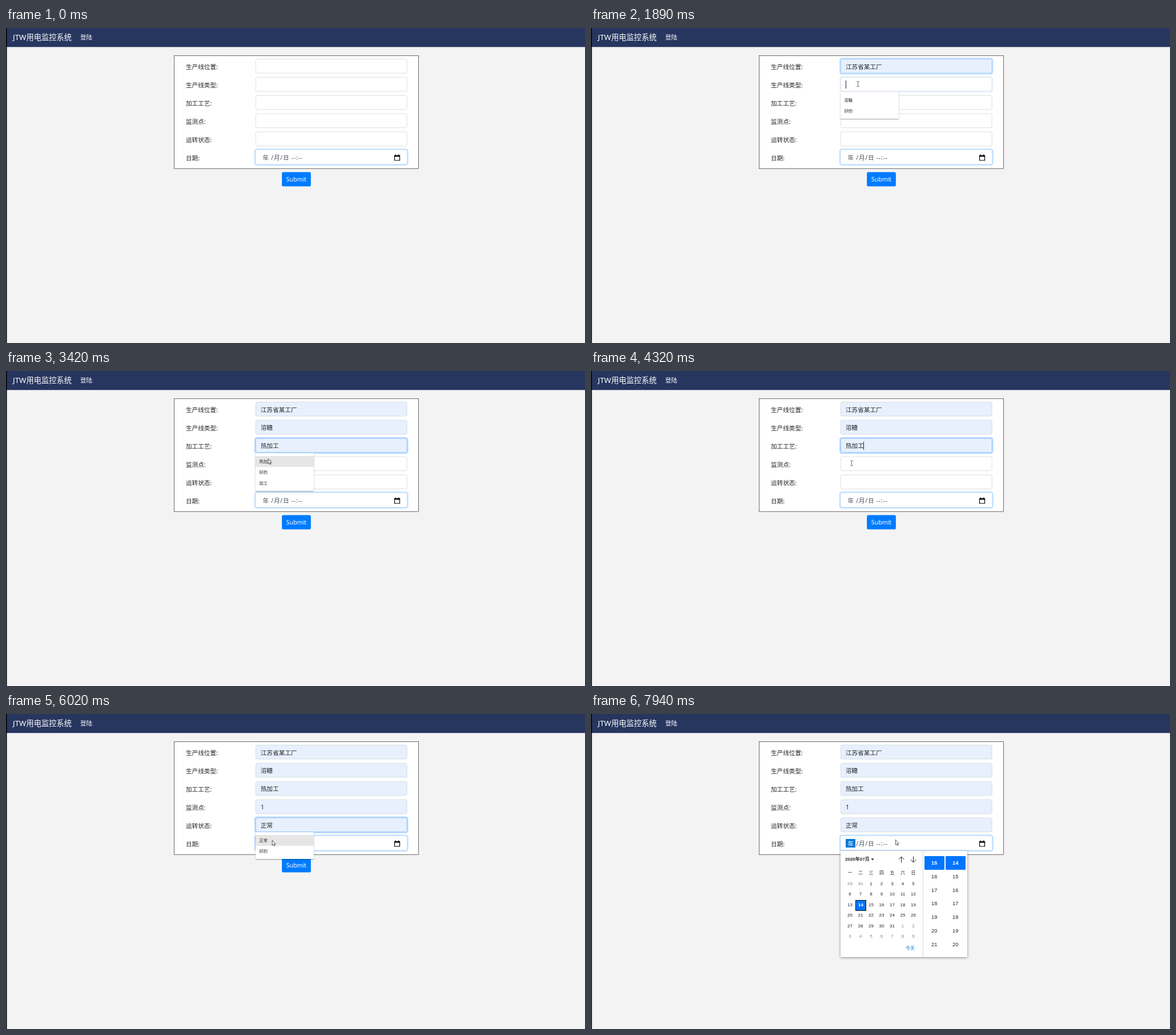
These frames come from a looping animation (1014 by 552 pixels, 8 s). An HTML page:

```html
<!DOCTYPE html>
<html lang="zh-CN">
<head>
<meta charset="utf-8">
<style>
  html, body { margin: 0; width: 100%; height: 100%; overflow: hidden; background: #f3f3f3; }
  body { position: relative; color: #212529; font: 10.63px "Noto Sans", "Noto Sans CJK SC", "Noto Sans CJK", sans-serif; }
  div { position: absolute; box-sizing: border-box; white-space: pre; }
  svg { position: absolute; left: 0; top: 0; overflow: visible; }
  .light { color: #fff; }
  .brand { font-size: 13.3px; }
  .center { text-align: center; }
  .caret { background: #222; }
  .date { color: #495057; letter-spacing: .7px; }
  .mark { background: #0078d7; }
  .menu { background: #fff; border-radius: 1px; box-shadow: 0 1px 2px rgba(0,0,0,.38); font-size: 7.3px; }
  .item { padding-left: 6.5px; }
  .picker { background: #fff; box-shadow: 0 1px 4px rgba(0,0,0,.45); font: 8px "Liberation Sans", "Noto Sans CJK SC", "Noto Sans CJK", sans-serif; }
  .title { font-weight: bold; }
  .cell, .hour { text-align: center; color: #222; }
  .hour { font-size: 9.33px; }
  .dim { color: #858585; }
  .today { color: #0078d7; }
  .rule { background: #d5d5d5; }
  .on { background: #0075ff; color: #fff; font-weight: bold; border-radius: 1px; }
  .cell.on { border: 1.5px solid #101010; border-radius: 0; }
</style>
</head>
<body>
<script>
const LOOP = 8000, LEFT = 437, WIDTH = 265.5, HEIGHT = 25.3, PITCH = 31.88, ROW = 19;
const fieldTop = k => 54.1 + PITCH * k;

function add(parent, cls, x, y, w, h, text = '') {
  const el = document.createElement('div');
  el.className = cls;
  el.style.cssText = `left:${x}px;top:${y}px;width:${w}px;height:${h}px;line-height:${h}px`;
  el.textContent = text;
  parent.append(el);
  return el;
}
function draw(parent, markup) {
  const svg = document.createElementNS('http://www.w3.org/2000/svg', 'svg');
  svg.setAttribute('width', 1);
  svg.setAttribute('height', 1);
  svg.innerHTML = markup;
  parent.append(svg);
  return svg;
}
// Rectangle by its outer edge; grow widens it on all sides
const rect = (x, y, w, h, grow, attrs) =>
  `<rect x="${x - grow}" y="${y - grow}" width="${w + 2 * grow}" height="${h + 2 * grow}" ${attrs}/>`;
const show = (el, on) => { el.style.visibility = on ? 'visible' : 'hidden'; };

// Static page
const page = document.body;
const LINE = .66;
draw(page,
  rect(0, 0, 1014, 33.3, 0, 'fill="#27365f"') +
  rect(0, 0, 1.5, 552, 0, 'fill="#000"') +
  rect(294, 48, 429, 198.6, -LINE / 2, `fill="#fff" stroke="#222" stroke-width="${LINE}"`) +
  rect(483.2, 252.4, 50.7, 25.2, 0, 'rx="2.7" fill="#007bff"'));
add(page, 'light brand', 12, 6, 110, 20, 'JTW用电监控系统');
add(page, 'light', 130, 6, 40, 20, '登陆');
add(page, 'light center', 483, 255, 51, 20, 'Submit');
['生产线位置', '生产线类型', '加工工艺', '监测点', '运转状态', '日期'].forEach((name, k) =>
  add(page, '', 315, 58.3 + PITCH * k, 100, 20, name + ':'));

// Form: focus time, time of choosing, where the pointer chooses, suggestions
const fields = [
  [880, 1570, [467.5, 98], ['江苏省某工厂']],
  [1850, 2630, [467, 123.5], ['溶糖', '好的']],
  [2940, 4320, [456.5, 161.5], ['热加工', '好的', '加工']],
  [4540, 5400, [464.5, 193], ['1', '2', '好的']],
  [5470, 6500, [466, 222], ['正常', '好的']],
  [7330, Infinity, null, []]
].map(([open, done, pick, items], k) => {
  const top = fieldTop(k);
  const svg = draw(page,
    rect(LEFT, top, WIDTH, HEIGHT, 2.1, 'rx="4.5" fill="#bfdeff"') +
    rect(LEFT, top, WIDTH, HEIGHT, -LINE / 2, `rx="2.5" stroke-width="${LINE}"`));
  const [ring, box] = svg.children;
  return { open, done, pick, items, top, ring, box };
});
fields.forEach((f, k) => { f.blur = k < 5 ? fields[k + 1].open : Infinity; });
const inputs = fields.slice(0, 5);

const measure = document.createElement('canvas').getContext('2d');
measure.font = getComputedStyle(page).font;
for (const f of inputs) {
  f.value = add(page, '', 446, f.top + 3.5, 200, 20);
  f.caret = add(page, 'caret', 446, f.top + 6, 1, 14);
}

const mark = add(page, 'mark', 446, 219, 17, 15);
const date = add(page, 'date', 449.5, 217, 100, 20);
date.innerHTML = '<span>年</span> /月/日 --:--';
const year = date.firstChild;
draw(page, `<path d="M680.5 223.5h9v8.500h-9z" fill="none" stroke="#000" stroke-width="1.2"/>
  <path d="M680 223h10v2.500h-10zM681.500 221.500h1.400v2h-1.400zM687 221.500h1.400v2h-1.400z"/>`);

for (const f of inputs) {
  f.menuTop = Math.round(f.top + HEIGHT + .5);
  f.menuHeight = 9 + ROW * f.items.length;
  f.menu = add(page, 'menu', LEFT, f.menuTop, 102, f.menuHeight);
  f.rows = f.items.map((s, i) => add(f.menu, 'item', 0, 4.5 + ROW * i, 102, ROW, s));
}

// Date picker, in its own coordinates
const picker = add(page, 'picker', LEFT, 240, 222, 186);
add(picker, 'title', 8, 5, 60, 20, '2020年07月');
draw(picker, `<path d="M53.5 13.5h5l-2.500 2.800z"/>
  <path d="M106.500 20.500V10M102 14.800l4.500-4.800 4.500 4.800M127.500 9.500V20M123 15.200l4.500 4.800 4.500-4.800" fill="none" stroke="#222"/>`);
const cell = (col, row, s, cls = '') =>
  add(picker, 'cell ' + cls, 7.3 + 18.5 * col, 30 + 18.55 * row, 18.5, 18.5, s);
[...'一二三四五六日'].forEach((s, i) => cell(i, 0, s));
for (let i = 0; i < 42; i++) {
  const day = new Date(2020, 5, 29 + i), inside = day.getMonth() === 6;
  cell(i % 7, 1 + (i / 7 | 0), day.getDate(), inside ? '' : 'dim');
}
add(picker, 'cell on', 26, 85.5, 19, 19, 14).style.lineHeight = '16px';
add(picker, 'today', 114, 161, 24, 20, '今天');
add(picker, 'rule', 144, 0, 1, 186);
[15, 14].forEach((first, c) => {
  for (let i = 0; i < 7; i++)
    add(picker, 'hour' + (i ? '' : ' on'), 147 + 37 * c, 9 + 23.75 * i, 34.5, 24, first + i);
});

// Pointer: comes in, drops to each suggestion, then goes to the calendar icon
const pointer = draw(page, `
  <path d="M.3 .3V9.300L2.300 7.500 3.700 10.600 5 10 3.700 7H6.300z" fill="#fff" stroke="#333" stroke-width=".8"/>
  <path d="M-2.300-4.500H-.7L0-4 .7-4.500H2.300M0-4V4M-2.300 4.500H-.7L0 4 .7 4.500H2.300" fill="none" stroke="#555" stroke-width=".9"/>`);
const [arrow, beam] = pointer.children;
const ENTER = 190, START = [956, 541];
const moves = [
  [ENTER, 730, [481, 62]],
  ...inputs.map(f => [f.open + 200, f.open + 600, f.pick]),
  [6500, 6870, [652, 242]],
  [6930, 7250, [685, 225]],
  [7480, 7940, [533, 220]]
];

const ease = (t, from, to) => {
  const u = Math.min(1, Math.max(0, (t - from) / (to - from)));
  return u * u * (3 - 2 * u);
};
const locate = t => moves.reduce(([x, y], [from, to, [px, py]]) => {
  const e = ease(t, from, to);
  return [x + (px - x) * e, y + (py - y) * e];
}, START);
const mix = (a, b, u) => `rgb(${a.map((v, i) => Math.round(v + (b[i] - v) * u))})`;

function render(t) {
  const [x, y] = locate(t);
  let overMenu = false;
  for (const f of fields) {
    const glow = ease(t, f.open, f.open + 150) * (1 - ease(t, f.blur, f.blur + 150));
    f.ring.style.opacity = glow;
    f.box.style.stroke = mix([200, 207, 214], [108, 178, 255], glow);
    f.box.style.fill = '#fff';
  }
  for (const f of inputs) {
    const open = t >= f.open && t < f.done;
    const inMenu = open && y >= f.menuTop && y < f.menuTop + f.menuHeight;
    const hover = inMenu ? Math.floor((y - f.menuTop - 4.5) / ROW) : -1;
    overMenu = overMenu || inMenu;
    show(f.menu, open);
    f.rows.forEach((row, i) => { row.style.background = i === hover ? '#e6e6e6' : 'none'; });
    const text = t >= f.done ? f.items[0] : f.items[hover] || '';
    f.value.textContent = text;
    if (text) f.box.style.fill = '#e8f0fe';
    const since = t - (t >= f.done ? f.done : f.open);
    const focused = t >= f.open && t < f.blur;
    show(f.caret, focused && !(open && text) && since % 1060 < 530);
    f.caret.style.left = 446 + Math.floor(measure.measureText(text).width) + 'px';
  }
  const dated = t >= fields[5].open;
  show(mark, dated);
  year.style.color = dated ? '#fff' : '';
  show(picker, t >= fields[5].open + 75);

  const overInput = !overMenu && x > LEFT && x < LEFT + WIDTH &&
    inputs.some(f => y >= f.top && y < f.top + HEIGHT);
  show(arrow, t >= ENTER && !overInput);
  show(beam, t >= ENTER && overInput);
  pointer.style.transform = `translate(${x}px,${y}px)`;
}

function frame() {
  render(performance.now() % LOOP);
  requestAnimationFrame(frame);
}
frame();
</script>
</body>
</html>
```
